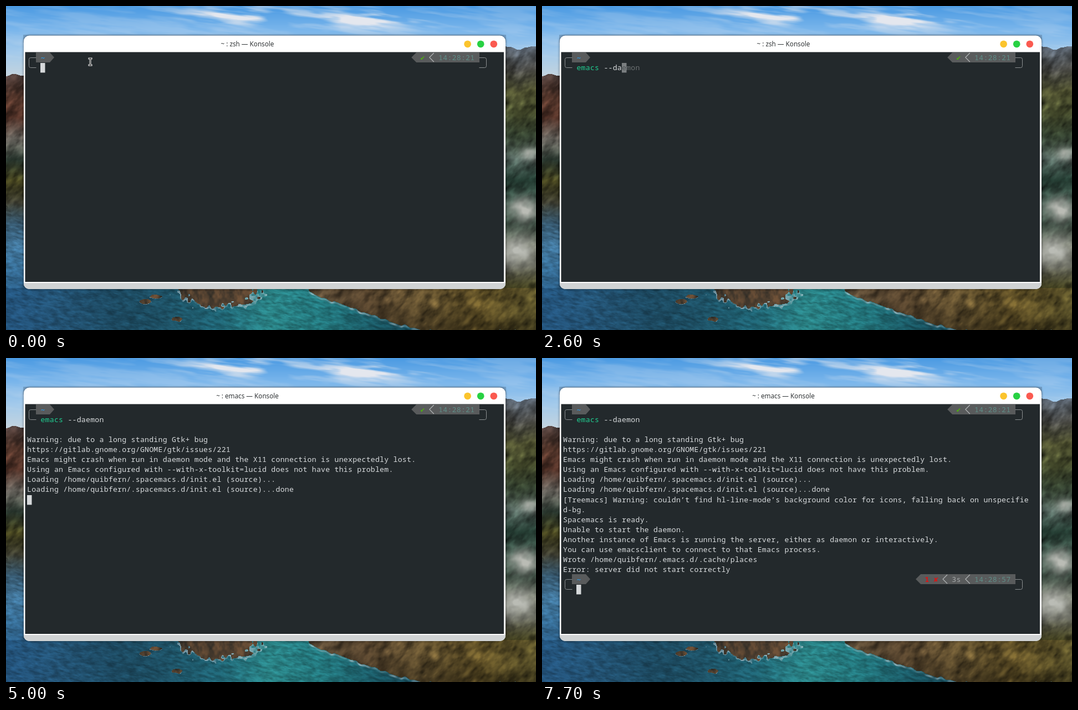
These frames come from a looping animation (956 by 586 pixels, 8 s). An HTML page with a canvas:

```html
<!DOCTYPE html>
<html lang="en">
<head>
<meta charset="utf-8">
<title>Terminal</title>
<style>
  html, body { margin: 0; width: 100%; height: 100%; overflow: hidden; background: #23292c; }
  canvas { display: block; width: 956px; height: 586px; }
</style>
</head>
<body>
<canvas id="stage" width="956" height="586"></canvas>
<script>
const W = 956, H = 586, LOOP = 8000;
const CELL = 8.155, LEFT = 38, ROW = 18.09, TOP = 84.7;
const MONO = '13.2px "Noto Sans Mono", "DejaVu Sans Mono", monospace';
const SYMBOL = '13px "DejaVu Sans Mono", "DejaVu Sans", monospace';
const COLOR = {
  screen: '#23292c', text: '#d9dcde', hint: '#6c7173', command: '#20cf92',
  error: '#e01212', ok: '#4fae12', chip: '#595b5c', path: '#2b9ff0',
  time: '#5f8d87', frame: '#8c9092', cursor: '#d6d9db'
};

// Keystrokes as they reach the screen, then the output in blocks of lines.
const COMMAND = 'emacs --daemon';
const KEYS = [[670, 'e'], [800, 'm'], [1770, 'acs '], [1830, '-'], [2030, '-'],
  [2400, 'd'], [2600, 'a'], [2770, 'em'], [3730, 'on']];
const ENTER = 4400, TITLE_CHANGE = 5000, NEW_PROMPT = 7700;
const OUTPUT = [
  [4570, `
Warning: due to a long standing Gtk+ bug
https://gitlab.gnome.org/GNOME/gtk/issues/221
Emacs might crash when run in daemon mode and the X11 connection is unexpectedly lost.
Using an Emacs configured with --with-x-toolkit=lucid does not have this problem.`],
  [4830, `Loading /home/quibfern/.spacemacs.d/init.el (source)...
Loading /home/quibfern/.spacemacs.d/init.el (source)...done`],
  [7170, `[Treemacs] Warning: couldn’t find hl-line-mode’s background color for icons, falling back on unspecifie
d-bg.`],
  [7430, 'Spacemacs is ready.'],
  [7570, `Unable to start the daemon.
Another instance of Emacs is running the server, either as daemon or interactively.
You can use emacsclient to connect to that Emacs process.
Wrote /home/quibfern/.emacs.d/.cache/places
Error: server did not start correctly`]
];

const view = document.getElementById('stage').getContext('2d');
const backdrop = document.createElement('canvas');
backdrop.width = W;
backdrop.height = H;
let ctx = backdrop.getContext('2d');

// Wallpaper: evenly spaced colour ramps, shaded by value noise.
const palette = text => text.split(' ').map(c => [0, 2, 4].map(i => parseInt(c.substr(i, 2), 16)));
const SKY = palette('4b9ae2 79b5eb a3caeb c2d3df');
const WEST = palette('4a3b38 5a3a2e 4f3026 6e6a63 26332b 4c4a22 3a3a2e 35566c 42769b 376c93 2d6088 235279 1c456a');
const EAST = palette('56606c 4a4a46 4f5130 454b2c 3b4a36 4f5f58 22382f 2f4239 324439 55584d 4f5044 45431f');
const SEA = palette('23527a 235273 1d4a62 1d4f63 1f6272 2a8285 23767c 1a5763 164453');
const LAND = palette('4a3d2c 463725 58482a 5b4c24 4d4623');
const ROCK = palette('2c2a25 705238');
const WHITE = [228, 231, 238], FOG = [186, 188, 181];
const WISPS = [[420, 16], [650, 24]];
const FOG_BANKS = [[945, 267], [934, 367], [922, 443]];
const ISLETS = [[250, 534, 10], [270, 525, 10], [308, 566, 9], [385, 514, 68]];

const clamp = v => Math.max(0, Math.min(1, v));
const mix = (a, b, k) => a.map((v, i) => v + (b[i] - v) * k);
const shade = (color, k) => color.map(v => v * k);
const bump = (dx, dy) => Math.exp(-dx * dx - dy * dy);

function ramp(colors, u) {
  const p = clamp(u) * (colors.length - 1), i = Math.min(Math.floor(p), colors.length - 2);
  return mix(colors[i], colors[i + 1], p - i);
}

function hash(x, y) {
  const v = Math.sin(x * 127.1 + y * 311.7) * 43758.5453;
  return v - Math.floor(v);
}

function noise(x, y) {
  const ix = Math.floor(x), iy = Math.floor(y);
  const [u, v] = [x - ix, y - iy].map(f => f * f * (3 - 2 * f));
  const across = row => hash(ix, row) * (1 - u) + hash(ix + 1, row) * u;
  return across(iy) * (1 - v) + across(iy + 1) * v;
}

const fractal = (x, y) => noise(x, y) * 0.55 + noise(x * 2, y * 2) * 0.3 + noise(x * 4, y * 4) * 0.15;
const slope = (color, x, y) => shade(color, 0.35 + 1.3 * fractal((x + y) / 14, (x - y) / 26));
const water = (color, x, y) => shade(color, 0.7 + 0.6 * fractal((x + y) / 12, (y - x * 0.3) / 4));

function skyAt(x, y) {
  const mask = WISPS.reduce((sum, [cx, cy]) => sum + bump((x - cx) / 95, (y - cy) / 17), 0.2);
  const wisp = clamp((fractal(x / 70, (y - x * 0.12) / 10) - 0.36) * 3.2);
  return mix(ramp(SKY, y / 125), WHITE, clamp(mask * wisp));
}

function coastAt(x, y) {
  const shore = 512 + 74 * Math.pow(clamp((x - 545) / 205), 0.8) + 5 * noise(x / 9, 3);
  if (x > 545 && y < shore - 2) {
    const dusk = 1.1 - 0.4 * clamp((y - 535) / 50);
    return shade(slope(ramp(LAND, (x - 545) / 411), x, y), dusk);
  }
  for (const [cx, cy, r] of ISLETS) {
    const d = Math.hypot((x - cx) / r, (y - cy) / (r * 0.42)) + 0.5 * (noise(x / 6, y / 6) - 0.5);
    if (d < 1) return ramp(ROCK, fractal(x / 9, y / 14) * 1.6 - 0.3);
    if (d < 1.12 && y > cy) return mix(ramp(SEA, x / 760), WHITE, 0.6 * noise(x / 4, y / 3));
  }
  const sea = water(ramp(SEA, x / 760), x, y);
  const surf = x > 545 ? clamp(1 - Math.abs(y - shore) / 3) : 0;
  return mix(sea, WHITE, surf * noise(x / 7, y / 5) * 0.7);
}

function hillsideAt(x, y, ridge) {
  if (x < W / 2) {
    const color = ramp(WEST, (y - ridge) / (H - ridge));
    return y > 372 + 30 * (noise(x / 12, 8) - 0.5) ? water(color, x, y) : slope(color, x, y);
  }
  const color = slope(ramp(EAST, (y - ridge) / (512 - ridge)), x, y);
  const fog = FOG_BANKS.reduce((sum, [cx, cy]) => {
    const r = 11 + (cy - 267) / 11;
    return sum + bump((x - cx) / (r * 1.4), (y - cy) / r);
  }, 0);
  return mix(color, FOG, clamp(fog * (0.4 + fractal(x / 18, y / 18))));
}

function wallpaperAt(x, y) {
  const ridge = (x < W / 2 ? 120 : 70) + 10 * noise(x / 14, 5);
  if (y < ridge) return skyAt(x, y);
  return y < 510 ? hillsideAt(x, y, ridge) : coastAt(x, y);
}

function paintWallpaper() {
  const image = ctx.createImageData(W, H);
  for (let y = 0; y < H; y++) {
    for (let x = 0; x < W; x++) image.data.set([...wallpaperAt(x, y), 255], (y * W + x) * 4);
  }
  ctx.putImageData(image, 0, 0);
}

function paintWindow() {
  ctx.fillStyle = '#6488ad90';
  ctx.fillRect(31, 52, 871, 14);
  ctx.save();
  ctx.shadowColor = '#00000080';
  ctx.shadowBlur = 4;
  ctx.fillStyle = '#fff';
  ctx.beginPath();
  ctx.roundRect(32, 53.5, 869, 458.5, 10);
  ctx.fill();
  ctx.restore();
  ctx.save();
  ctx.clip();
  ctx.fillStyle = '#d0d3d4';
  ctx.fillRect(32, 501, 869, 12);
  ctx.restore();
  ctx.fillStyle = COLOR.screen;
  ctx.fillRect(34.5, 83.4, 863.5, 415.6);
  ['#fbc42d', '#28d143', '#fa5a50'].forEach((fill, i) => {
    ctx.fillStyle = fill;
    ctx.beginPath();
    ctx.arc(832.6 + i * 23.6, 68.8, 6.4, 0, 7);
    ctx.fill();
  });
}

const columnX = column => LEFT + column * CELL;
const rowY = row => Math.round(TOP + row * ROW);

function write(text, column, row, fill, font = MONO) {
  ctx.font = font;
  ctx.fillStyle = fill;
  ctx.textAlign = 'left';
  [...text].forEach((c, i) => ctx.fillText(c, columnX(column + i), rowY(row) + 13));
}

function line(color, width, trace) {
  ctx.strokeStyle = color;
  ctx.lineWidth = width;
  ctx.beginPath();
  trace();
  ctx.stroke();
}

// A bar whose ends are offset at mid-height, as arrow points or flat edges.
function chip(left, right, leftPoint, rightPoint, y) {
  ctx.fillStyle = COLOR.chip;
  ctx.beginPath();
  ctx.moveTo(left, y);
  ctx.lineTo(right, y);
  ctx.lineTo(right + rightPoint, y + 9);
  ctx.lineTo(right, y + 18);
  ctx.lineTo(left, y + 18);
  ctx.lineTo(left - leftPoint, y + 9);
  ctx.fill();
}

function bracket(edge, side, y) {
  line(COLOR.frame, 1, () => {
    ctx.moveTo(edge, y + 9.5);
    ctx.arcTo(side, y + 9.5, side, y + 18, 3);
    ctx.arcTo(side, y + 27.5, edge, y + 27.5, 3);
    ctx.lineTo(edge, y + 27.5);
  });
}

function chevron(column, row) {
  const x = columnX(column), y = rowY(row) - 1;
  line('#b4b7b8', 1.1, () => {
    ctx.moveTo(x + 8, y + 1);
    ctx.lineTo(x, y + 9);
    ctx.lineTo(x + 8, y + 17);
  });
}

function prompt(row, startColumn, clock) {
  const y = rowY(row) - 1;
  chip(54, 79, 0, 8, y);
  chip(columnX(startColumn) + 9, 854, 9, 0, y);
  bracket(54.5, 41.5, y);
  bracket(853.5, 866.5, y);
  write('~', 3, row, COLOR.path, `bold ${MONO}`);
  chevron(89, row);
  write(clock, 91, row, COLOR.time);
}

function cursor(column, row, fill = COLOR.cursor) {
  ctx.fillStyle = fill;
  ctx.fillRect(Math.round(columnX(column)), rowY(row), 8.5, rowY(row + 1) - rowY(row) - 0.5);
}

function commandLine(t) {
  const typed = KEYS.filter(([at]) => at <= t).map(([, keys]) => keys).join('').length;
  const suggesting = typed > 0 && typed < COMMAND.length;
  const word = COMMAND.indexOf(' ');
  [...COMMAND].forEach((c, i) => {
    const program = typed < word ? COLOR.error : COLOR.command;
    const fill = i >= typed ? COLOR.hint : i < word ? program : COLOR.text;
    if (typed) write(c, 3 + i, 1, fill);
  });
  if (t >= ENTER) return;
  cursor(3 + typed, 1, suggesting ? '#7b7f81' : COLOR.cursor);
  if (suggesting) write(COMMAND[typed], 3 + typed, 1, '#4c5255');
}

function output(t) {
  let row = 2;
  for (const [at, block] of OUTPUT) {
    if (t < at) break;
    for (const text of block.split('\n')) write(text, 0, row++, COLOR.text);
  }
  return row;
}

function failedPrompt(row) {
  prompt(row, 78, '14:28:57');
  write('1', 80, row, COLOR.error, `bold ${MONO}`);
  write('✘', 82, row, COLOR.error, SYMBOL);
  chevron(84, row);
  write('3s', 86, row, '#a5a8a9');
  cursor(3, row + 1);
}

function pointer(x, y) {
  const beam = () => {
    for (const end of [-6, 6]) {
      ctx.moveTo(x - 2, y + end);
      ctx.lineTo(x + 2, y + end);
    }
    ctx.moveTo(x, y - 6);
    ctx.lineTo(x, y + 6);
  };
  ctx.lineCap = 'square';
  line('#f2f2f2', 3, beam);
  line('#111', 1, beam);
  ctx.lineCap = 'butt';
}

function draw(t) {
  ctx.drawImage(backdrop, 0, 0);
  ctx.font = '11.7px "Noto Sans", "Open Sans", sans-serif';
  ctx.fillStyle = '#303436';
  ctx.textAlign = 'center';
  ctx.fillText(`~ : ${t < TITLE_CHANGE ? 'zsh' : 'emacs'} — Konsole`, 435.5, 72.5);

  prompt(0, 85, '14:28:21');
  write('✔', 87, 0, COLOR.ok, SYMBOL);
  commandLine(t);
  const nextRow = output(t);
  if (t >= NEW_PROMPT) failedPrompt(nextRow);
  else if (t >= ENTER) cursor(0, nextRow);
  if (t < KEYS[0][0]) pointer(152, 101);
}

paintWallpaper();
paintWindow();
ctx = view;

function tick() {
  draw(performance.now() % LOOP);
  requestAnimationFrame(tick);
}
tick();
</script>
</body>
</html>
```
